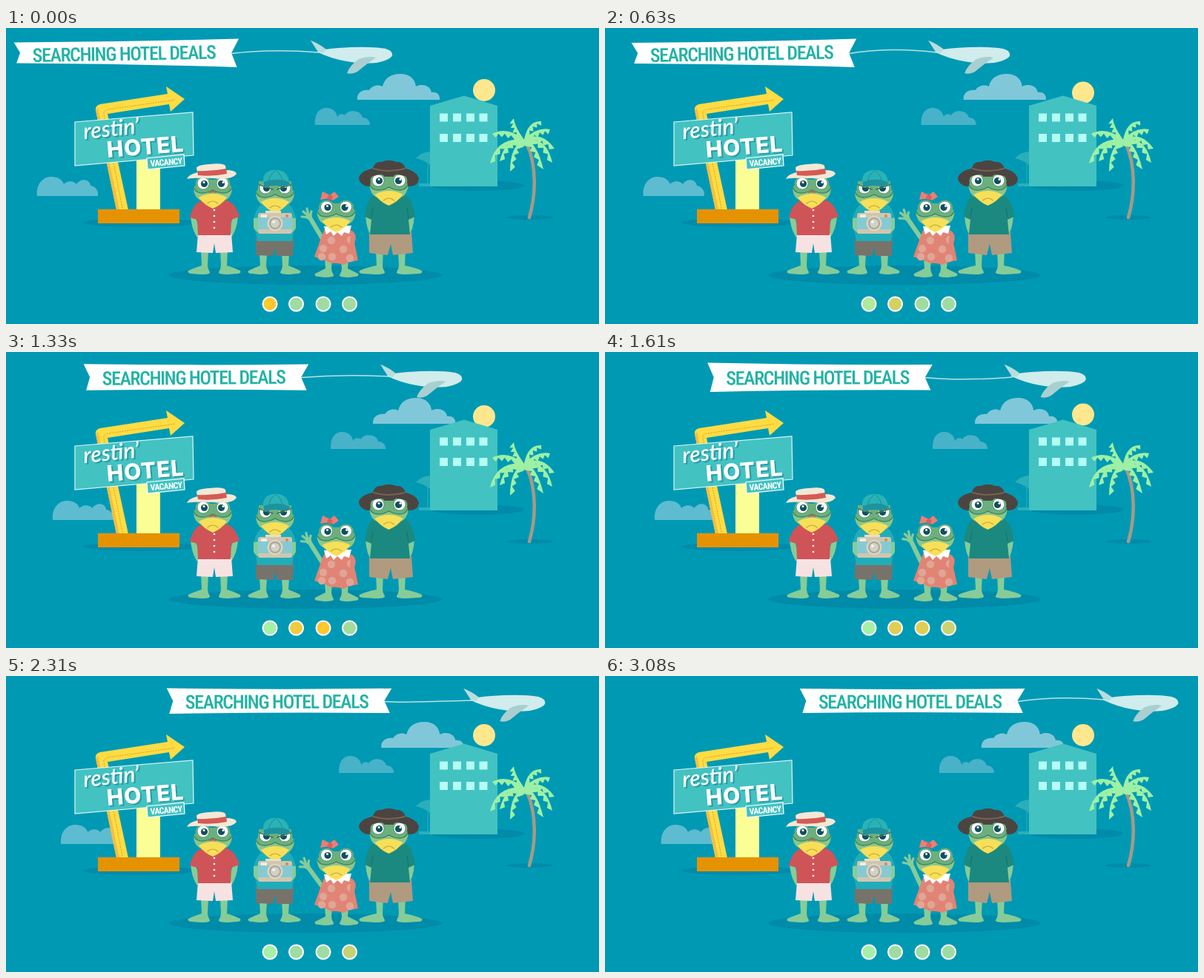
Recreate the animation shown at these times as an HTML page. Size 800 px wide and 400 px high, loop 3150 ms.

```html
<!DOCTYPE html>
<html lang="en">
<head>
<meta charset="utf-8">
<title>Searching hotel deals</title>
<style>
html, body { margin: 0; width: 100%; height: 100%; overflow: hidden; background: #0099b4; }
svg { display: block; }
text { text-anchor: middle; }
.narrow { font-family: "Roboto Condensed", Roboto, "Open Sans", sans-serif; font-stretch: condensed; letter-spacing: -.05em; }
.script { font: italic 600 30px Lato, sans-serif; }
.bold { font: 800 30px Inter, sans-serif; letter-spacing: .8px; }
</style>
</head>
<body>
<svg id="stage" width="800" height="400" viewBox="0 0 800 400"></svg>
<script>
const LOOP = 3150, STEP = 70;
const TEAL = '#43c2c2', SHADE = '#008ba9', SKIN = '#86cc98', HEAD = '#6bb07c';

const path = (d, fill, more = '') => `<path d="${d}" fill="${fill}" ${more}/>`;
const line = (d, color, w = 1, more = '') => path(d, 'none', `stroke="${color}" stroke-width="${w}" stroke-linecap="round" ${more}`);
const oval = (x, y, rx, ry, fill, more = '') => `<ellipse cx="${x}" cy="${y}" rx="${rx}" ry="${ry}" fill="${fill}" ${more}/>`;
const disc = (x, y, r, fill, more) => oval(x, y, r, r, fill, more);
const box = (x, y, w, h, fill, more = '') => `<rect x="${x}" y="${y}" width="${w}" height="${h}" fill="${fill}" ${more}/>`;
const group = (id, inner) => `<g id="${id}">${inner}</g>`;
const both = (x, y, part) => [1, -1].map(s => `<g transform="translate(${x} ${y}) scale(${s} 1)">${part}</g>`).join('');

function head(x, y, gap = 13) {
  const eye = s => disc(s * gap, -3, 10.5, HEAD) + disc(s * gap, -4, 8, '#fff', 'stroke="#4d8f69" stroke-width=".8"') +
    disc(s * (gap - 1.5), -3.5, 4.6, '#12505e') + disc(s * gap + 1, -5.5, 1.5, '#fff');
  return `<g transform="translate(${x} ${y})">` +
    path('M-25 0Q-27 14 -15 20H15Q27 14 25 0Q12 -11 0 -9Q-12 -11 -25 0', HEAD) +
    path('M-26 3Q-25 14 -18 18L0 14L18 18Q25 14 26 3Q20 10 12 9L0 5L-12 9Q-20 10 -26 3', '#8ac78a') +
    path('M-19 15Q-10 10 0 10Q10 10 19 15Q12 25 0 30Q-12 25 -19 15', '#f8df58') +
    eye(-1) + eye(1) +
    line('M-25 3Q-22 10 -12 9Q-5 8 0 5Q5 8 12 9Q22 10 25 3', '#3c7a5a', 1.2) +
    line('M-7 23q7 -6 14 0', '#c4a53c', 1.2) + '</g>';
}

// Both legs of a figure: inner half gap, outer reach of the foot, top and ground.
const legs = (x, gap, reach, top, ground) => both(x, 0,
  path(`M${gap - 5} ${top}H${gap + 5}L${gap + 4} ${ground - 12}Q${reach - 8} ${ground - 9} ${reach} ${ground - 5}
    q2 4 -5 4L${gap + 6} ${ground}Q${gap - 8} ${ground} ${gap - 7} ${ground - 3}Q${gap - 4} ${ground - 8} ${gap - 4} ${ground - 12}Z`, SKIN));

const arms = (x, y, out, h) => both(x, y,
  path(`M${out - 8} 0L${out - 1} -2Q${out - 2} ${h * .6} ${out - 10} ${h}L${out - 14} ${h - 4}Z`, SKIN));

function man() {
  return legs(281, 13, 35, 300, 333) + arms(281, 255, 33, 28) +
    path('M259 278H304L306 303L283 304L281 291L279 304L257 303Z', '#f7e2e2') +
    path('M264 233L298 233Q309 236 315 255L304 259L303 280H259L258 259L248 256Q252 238 264 233Z', '#cf5457') +
    [246, 254, 262, 270].map(y => disc(281, y, 1.3, '#fff')).join('') +
    head(279, 214) + line('M275 222q4 -2 8 0', '#b56b55', 2.5) +
    path('M244 204Q247 197 260 195L296 192Q310 192 311 197Q305 206 279 203Q252 202 244 204', '#f3e8d5') +
    path('M257 189Q258 185 275 184Q292 182 296 186L298 199Q278 203 259 201Z', '#f3e8d5') +
    path('M258 193Q278 194 297 190L298 197Q278 201 259 199Z', '#d45a55');
}

function photographer() {
  return legs(362, 15, 35, 305, 333) +
    path('M337 284H388L387 308L365 308L363 297L360 308L337 307Z', '#77736b') +
    path('M347 237H380Q389 243 391 259L386 288H339L334 259Q337 242 347 237Z', '#20adb9') +
    path('M334 257l9 -1l3 20q-8 2 -12 -6zM391 257l-9 -1l-2 20q8 2 11 -6z', SKIN) +
    head(363, 220) + path('M341 211L362 217L385 211V207H341Z', HEAD) +
    line('M342 212L360 218M384 212L366 218', '#41755c', 1.8) +
    path('M347 211Q345 192 363 192Q381 191 382 210Q365 206 347 211', '#2ab2b7') +
    path('M348 208Q367 201 383 209Q382 216 365 213Q353 213 348 216Z', '#1c939f') +
    line('M363 193q-8 6 -8 13M365 193q7 6 8 13', '#178e99') +
    box(350, 247, 21, 7, '#e8dfc8') + box(340, 250, 46, 28, '#d0c6ae', 'rx="3"') +
    box(340, 256, 46, 16, '#85cad3') + box(344, 252, 8, 4, '#f3eee0') + disc(379, 254, 2, '#e28351') +
    disc(363, 264, 10.5, '#ded5c0') + disc(363, 264, 8, '#a9a79c') + disc(363, 264, 6, '#d2d1c6') + disc(361, 262, 2, '#f6f4ea');
}

function girl() {
  const spots = [[428, 298], [440, 309], [455, 299], [439, 287], [464, 311], [465, 286], [426, 309]];
  const arm = line('M427 285L411 258', SKIN, 6) +
    line('M409 256L399 255M408 254L401 248M408 253L406 244M410 255L412 248', SKIN, 3.2) + disc(409, 255, 4, SKIN);
  return legs(446, 11, 29, 312, 337) + group('arm', arm) +
    path('M430 271Q447 278 463 271L468 281L475 314Q462 316 455 320Q447 317 439 318Q427 312 416 309L426 281Z', '#e18475') +
    spots.map(([x, y]) => disc(x, y, 5.2, '#dfa696')).join('') +
    path('M465 273Q475 278 470 291L464 292Z', '#e18475') +
    path('M429 268L432 279L438 275L442 281L447 276L453 281L456 276L463 278L466 267Z', '#fff') +
    head(445.5, 246) +
    path('M437 230L424 232L427 221L437 226L443 221L449 228L441 233Z', '#ed7e74') + disc(437, 229, 3.5, '#d8615e');
}

function dad() {
  return legs(519, 15, 42, 300, 333) + arms(518, 255, 34, 29) +
    path('M490 276H547L549 304L522 307L519 292L515 307L490 304Z', '#b09a80') +
    path('M499 223H535Q549 231 552 255L543 259L545 279H491L493 259L484 255Q487 230 499 223Z', '#1b897f') +
    line('M493 256l2 -13M543 256l-2 -13', '#12736d') +
    path('M476 203Q478 193 495 190Q497 180 507 181Q516 177 526 181Q536 180 539 190Q555 194 557 204Q556 213 546 214H488Q477 212 476 203Z', '#4c4441') +
    head(516.5, 210, 14.5) +
    path('M492 201Q494 181 507 181Q516 177 526 181Q538 181 541 201Q517 193 492 201', '#4c4441') +
    line('M496 190Q517 196 538 190', '#766252', 2);
}

function palm() {
  const X = 699, Y = 153;
  const tips = [[653, 183, 662, 150], [656, 143, 676, 135], [685, 122, 686, 136], [722, 126, 704, 128],
    [734, 137, 716, 136], [740, 163, 722, 141], [737, 182, 729, 148], [725, 191, 716, 156], [680, 194, 680, 162], [666, 180, 674, 150]];
  const leaf = ([x, y, cx, cy]) => {
    const len = Math.hypot(x - X, y - Y), side = x < X ? -1 : 1;
    const nx = -side * (y - Y) / len, ny = side * (x - X) / len;
    const teeth = [.85, .78, .65, .58, .45, .38, .2].map((k, i) => {
      const w = i % 2 ? 2 : 7, curve = (a, c, b) => a * (1 - k) ** 2 + 2 * c * k * (1 - k) + b * k * k;
      return `L${curve(X, cx, x) + nx * w} ${curve(Y, cy, y) + ny * w}`;
    }).join('');
    return path(`M${X} ${Y - 2}Q${cx} ${cy - 3} ${x} ${y}${teeth}L${X} ${Y + 5}Z`, '#9df0a5');
  };
  return oval(706, 256, 31, 3, SHADE) + line('M706 256C715 225 716 187 703 157', '#a59a87', 4.5) + tips.map(leaf).join('');
}

function hotel() {
  const windows = [115.5, 143].map(y => [585, 603, 621, 638.5].map(x => box(x, y, 11, 11, '#b4fcf4')).join('')).join('');
  return oval(636, 213, 63, 7, SHADE) +
    path('M553 176Q560 168 572 167V185Q563 178 553 176M557 210H572V214H557Z', '#2aafba') + line('M569 180V212', '#2aafba') +
    path('M572 105L618 91.5L663 105V214H572Z', TEAL) + windows;
}

function sign() {
  const shadowed = (cls, x, y, word) => `<text class="${cls}" x="${x + 2}" y="${y + 2}" fill="#289da5">${word}</text><text class="${cls}" x="${x}" y="${y}" fill="#fff">${word}</text>`;
  return oval(181, 263, 77, 6, SHADE) +
    path('M176 178H208V246H176Z', '#fbfe95') +
    path('M121 111Q120 105 127 103L218 89L216 79L241 96L222 113L220 103L137 116L165 246H149Z', '#ffdc43') +
    path('M121 111L149 246H153L124 108Z', '#f3bd43') +
    line('M157 243L132 117Q131 111 138 110L229 97', '#d9a62c', 1, 'stroke-dasharray="1.5 2"') +
    box(124, 245, 110, 19, '#e59200') +
    path('M93 127L252 114L253 172L93 186Z', TEAL, 'stroke="#d9f6f3" stroke-width="1.2"') +
    `<g transform="rotate(-6 145 145)">${shadowed('script', 143, 146, 'restin’')}</g>
     <g transform="rotate(-4.5 188 162)">${shadowed('bold', 188, 171, 'HOTEL')}</g>` +
    path('M190 176L240 171L241 186L191 191Z', TEAL, 'stroke="#fff" stroke-width="1.2"') +
    '<text class="narrow" id="vacancy" x="216" y="185.5" font-size="12" font-weight="700" fill="#fff" transform="rotate(-5 216 181)">VACANCY</text>';
}

const plane = path('M411 17Q421 21 430 29L440 39L429 35Z', '#a9cfd1') +
  path('M419 32Q430 28 448 27Q490 24 512 28Q522 31 521 37Q519 43 500 47Q478 49 459 45Q437 41 419 32Z', '#d0ecec') +
  path('M411 17Q422 21 432 29L427 34L420 31Z', '#b9dddd') +
  path('M476 42Q489 37 499 40Q487 48 474 59Q467 63 460 61Q463 51 476 42Z', '#a9cfd1');

const dotX = [356, 391.5, 428, 463.5];
const stage = document.getElementById('stage');
stage.innerHTML = box(0, 0, 800, 400, '#0099b4') + disc(645, 84, 15, '#ffe78e', 'id="sun"') +
  group('clouds',
    path('M474 97C473 88 480 83 490 84C494 77 503 76 508 79C511 67 520 62 532 62C546 62 552 70 553 79C563 74 573 79 574 87C581 86 586 90 585 97Z', '#80c8d9') +
    path('M417 131C416 117 422 108 432 108C441 108 446 114 447 120C450 115 455 116 457 118C462 110 478 110 481 121C487 121 491 125 491 131Z', '#48b2c9') +
    path('M42 227C40 211 50 201 61 201C70 201 76 205 78 211C83 206 91 206 95 211C101 202 113 204 114 213C121 214 125 220 124 227Z', '#5ebcd1')) +
  hotel() + palm() + sign() + oval(404, 334, 184, 13, SHADE) +
  man() + photographer() + girl() + dad() +
  group('tow', line('', '#b8e3e5', 1.5, 'id="rope"') + plane + path('', '#fff', 'id="flag"') +
    '<text class="narrow" id="title" x="159" font-size="32" font-weight="500" fill="#22b3a4">SEARCHING HOTEL DEALS</text>') +
  dotX.map((x, i) => disc(x, 373, 9.5, '#9fdca1', `id="dot${i}" stroke="#fff" stroke-width="2"`)).join('');

const $ = id => document.getElementById(id);
const set = (id, name, value) => $(id).setAttribute(name, value);

// Largest font size, up to the one given, whose natural width fits.
function fit(id, room) {
  const size = +$(id).getAttribute('font-size');
  const fitted = Math.min(size, size * room / $(id).getComputedTextLength());
  set(id, 'font-size', fitted);
  return fitted;
}
set('title', 'y', 34.5 + fit('title', 247) * .36);
fit('vacancy', 43);

const TIMES = [0, 630, 1050, 1610, 2030, 2590, 3080];
function at(t, values, times = TIMES) {
  if (t <= times[0]) return values[0];
  const i = times.findIndex(x => x > t);
  if (i < 0) return values[values.length - 1];
  const u = (t - times[i - 1]) / (times[i] - times[i - 1]);
  return values[i - 1] + (values[i] - values[i - 1]) * (1 - Math.cos(Math.PI * u)) / 2;
}

const glow = [
  t => at(t, [1, .12, 0], [0, 630, 840]),
  t => at(t, [0, .55, 1, .68, .2, 0], [280, 630, 1050, 1610, 2030, 2310]),
  t => at(t, [0, .65, 1, .68, 0], [700, 1050, 1330, 1610, 2030]),
  t => at(t, [0, .45, 1, 0], [1260, 1610, 2030, 2520])
];
const mix = (a, b, u) => `rgb(${a.map((v, i) => Math.round(v + (b[i] - v) * u))})`;

function draw(t) {
  const tow = 254 * (1 - Math.cos(Math.PI * (t + 41) / 3290)) / 2;
  const drift = 34 - 22 * (1 - Math.cos(7.58e-4 * Math.max(0, 2835 - t)));
  set('tow', 'transform', `translate(${tow} 0)`);
  set('clouds', 'transform', `translate(${drift} 0)`);
  set('sun', 'cy', at(t, [84, 87.5, 89.5, 84.5, 80, 80, 80]));

  const lt = at(t, [19.5, 20, 18, 14.5, 16, 17, 17]), lb = at(t, [47.5, 48, 49.5, 54, 52, 50, 50]);
  const rt = at(t, [14.5, 14.5, 16, 17, 16.5, 17, 17]), rb = at(t, [53, 53, 52, 51.5, 50, 50, 50]);
  const top = (lt + rt) / 2 + 2, bottom = (lb + rb) / 2 - 2;
  set('flag', 'd', `M10.5 ${lt}Q162 ${top} 314 ${rt}L304 ${(rt + rb) / 2}L311.5 ${rb}Q162 ${bottom} 14 ${lb}L19 ${(lt + lb) / 2}Z`);
  set('title', 'transform', `rotate(${at(t, [-1, -1, -.7, -.3, -.3, -.1, -.1])} 159 35)`);
  set('rope', 'd', `M304 34.5C340 ${at(t, [30, 28, 25, 38, 39, 35, 29])} 385 ${at(t, [30, 28, 25, 37, 37, 30, 29])} 422 ${at(t, [33, 33, 32, 34, 34, 32, 32])}`);
  set('arm', 'transform', `rotate(${at(t, [0, -4, -8, 5, -17, 6, 6])} 427 285)`);
  glow.forEach((f, i) => set('dot' + i, 'fill', mix(i ? [159, 220, 161] : [165, 240, 166], [255, 200, 45], f(t))));
}

let start;
function tick(now) {
  start ??= now;
  draw(Math.floor((now - start) % LOOP / STEP) * STEP);
  requestAnimationFrame(tick);
}
draw(0);
requestAnimationFrame(tick);
</script>
</body>
</html>
```
